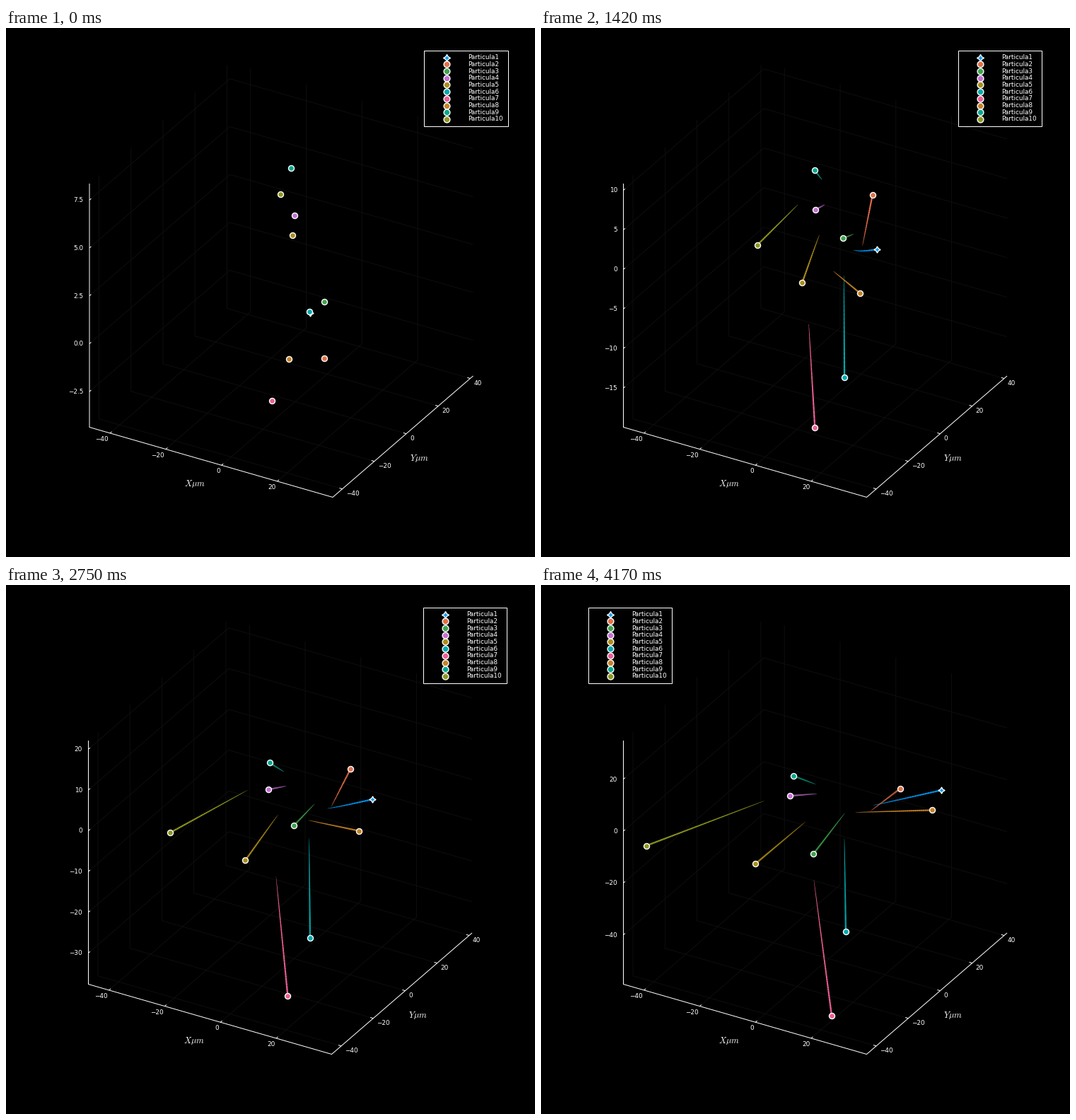
A matplotlib script for the animation above (4210 ms loop, 748 by 748 pixels).

```python
import numpy as np
import matplotlib.pyplot as plt
from matplotlib.animation import FuncAnimation
from matplotlib.collections import LineCollection
from matplotlib.patches import Rectangle

SIZE, FRAMES, LOOP = 748, 101, 4210
PT = 0.72  # points per pixel at 100 dpi
GRID = "#111111"

plt.rcParams["font.family"] = "DejaVu Sans"
plt.rcParams["mathtext.fontset"] = "cm"

# Plot box in pixels: left floor corner and the three edges
LEFT = np.array([118, 564.5])
EX = np.array([344, 99])
EY = np.array([198.5, -171.5])
UP = np.array([0, -344.5])
XLIM, YLIM = (-47.4, 39.9), (-46, 41.8)
TICK = 0.012

# Colour, start and velocity per frame: screen x, depth offset, height
PARTICLES = [
    ("#009AF9", (429.6, -31.4, 0.43), (1.38, -0.31, 0)),
    ("#E36F47", (450.2, -20.7, -1.54), (0.59, 0.79, 0.337)),
    ("#3EA44E", (449.8, -48.6, 0.4), (-0.63, 1.1, 0.077)),
    ("#C371D2", (408, -35, 5.42), (-0.545, -0.06, -0.028)),
    ("#AC8E18", (405, -18.2, 5), (-1, -0.14, -0.267)),
    ("#00AAAE", (429.5, -39, 0.22), (0.03, -0.26, -0.583)),
    ("#ED5E93", (376.5, -28, -4), (0.36, 1.115, -0.444)),
    ("#C68225", (399.6, -32.5, -2), (1.553, -0.69, -0.176)),
    ("#00A98D", (403.3, -32, 8), (-0.447, 0.03, 0.054)),
    ("#8E971E", (388.2, -48, 6.05), (-2.38, 0.2, -0.192)),
]
COLORS, START, SPEED = zip(*PARTICLES)
COUNT = len(COLORS)


def tracks():
    """Straight drift, bent at first where close neighbours push apart in height."""
    start, t = np.array(START), np.arange(FRAMES)
    gap = start[:, None] - start[None]
    near = np.exp(-np.linalg.norm(gap * (1, 1, 15), axis=2) / 7)
    push = 5 * (near * np.sign(gap[..., 2])).sum(axis=1)
    x, depth, z = (start[..., None] + np.array(SPEED)[..., None] * t).swapaxes(0, 1)
    return x, depth, z - push[:, None] * (1 - np.exp(-t / 10))


X, DEPTH, Z = tracks()

fig = plt.figure(figsize=(SIZE / 100, SIZE / 100), dpi=100, facecolor="black")


def layer():
    ax = fig.add_axes([0, 0, 1, 1])
    ax.axis("off")
    ax.set_ylim(SIZE, 0)
    return ax


def shift(ax, dx):
    """Move everything on a layer left by dx pixels."""
    ax.set_xlim(dx, dx + SIZE)


def label(ax, x, y, text, ha="left"):
    return ax.text(x, y, text, color="white", fontsize=8.9 * PT, ha=ha, va="center")


def num(v, digits=0):
    return f"{v:.{digits}f}".replace("-", "\u2212")


def lines(ax, segs, color, width, z):
    lc = LineCollection(segs, colors=color, linewidths=width * PT, zorder=z)
    ax.add_collection(lc, autolim=False)
    return lc


def marker(ax, i, x, y, size):
    shape, extra = ((4, 1, 0), 1.2) if i == 0 else ("o", 0)
    return ax.plot([x], [y], marker=shape, ms=(size + extra) * PT, mew=1.4 * PT,
                   mfc=COLORS[i], mec="white", ls="none", zorder=3.05 + i * 0.1)[0]


def axis_ticks(lim, corner, edge, step=20):
    """Round values inside the limits with their points on the edge."""
    lo, hi = lim
    for v in np.arange(np.ceil(lo / step), np.floor(hi / step) + 1) * step:
        yield v + 0.0, corner + (v - lo) / (hi - lo) * edge


plot, legend = layer(), layer()

# Fixed axes, x and y ticks and grid
grid, edges = [], [(LEFT + UP, LEFT, LEFT + EX, LEFT + EX + EY)]
for v, p in axis_ticks(XLIM, LEFT, EX):
    grid.append((p, p + EY, p + EY + UP))
    edges.append((p, p + TICK * EY))
    label(plot, p[0] - 2, p[1] + 8.5, num(v), "right")
for v, p in axis_ticks(YLIM, LEFT, EY):
    q = p + EX
    grid.append((q, p, p + UP))
    edges.append((q, q - TICK * EX))
    label(plot, q[0] + 5, q[1] + 6.7, num(v))
lines(plot, grid, GRID, 0.8, 1)
lines(plot, edges, "white", 1, 2)
for x, y, s in ((267, 648, r"$X\mu m$"), (584, 612, r"$Y\mu m$")):
    plot.text(x, y, s, color="white", fontsize=12.2 * PT, ha="center", va="baseline")

# Parts that are rebuilt every frame
z_grid = lines(plot, [], GRID, 0.8, 1)
z_marks = lines(plot, [], "white", 1, 2)
z_labels = [label(plot, LEFT[0] - 8.5, 0, "", "right") for _ in range(8)]
trails = [lines(plot, [], c, 1, 3 + i * 0.1) for i, c in enumerate(COLORS)]
dots = [marker(plot, i, 0, 0, 8) for i in range(COUNT)]

legend.add_patch(Rectangle((591.5, 31.5), 118.5, 107, fc="black", ec="white", lw=PT))
for i in range(COUNT):
    y = 41.6 + 9.7 * i
    marker(legend, i, 623, y, 8.8)
    label(legend, 653, y, f"Particula{i + 1}")


def z_ticks(lim):
    """Ticks at the widest step that still gives at least four."""
    for step in (20, 10, 5, 2.5):
        ticks = list(axis_ticks(lim, LEFT, UP, step))
        if len(ticks) >= 4:
            break
    return step, ticks


def update(n):
    past = Z[:, :n + 1]
    lo, hi = past.min(), past.max()
    pad = 0.03 * (hi - lo)
    lo, hi = lo - pad, hi + pad

    step, ticks = z_ticks((lo, hi))
    z_grid.set_segments([(p, p + EY, p + EY + EX) for _, p in ticks])
    z_marks.set_segments([(p, p + TICK * EY) for _, p in ticks])
    for text in z_labels:
        text.set_text("")
    for text, (v, p) in zip(z_labels, ticks):
        text.set_y(p[1] + 0.5)
        text.set_text(num(v, 1 if step == 2.5 else 0))

    # Shorter tick labels move the plot a little to the left
    dx = 1.5 if step > 2.5 else 0
    shift(plot, dx)
    shift(legend, 524.5 if n >= 72 else dx)

    # Trails show the latest 70 % of the path as a needle
    y = LEFT[1] + DEPTH[:, :n + 1] + (past - lo) / (hi - lo) * UP[1]
    age = (np.arange(1, n + 1) / max(n, 1) - 0.3) / 0.7
    seen = age > 0
    for i in range(COUNT):
        pts = np.column_stack([X[i, :n + 1], y[i]])
        trails[i].set_segments(np.stack([pts[:-1], pts[1:]], axis=1)[seen])
        trails[i].set_linewidth(2.4 * PT * np.sqrt(age[seen]))
        dots[i].set_data(pts[-1:, 0], pts[-1:, 1])
    return []


anim = FuncAnimation(fig, update, frames=FRAMES, interval=LOOP / FRAMES,
                     repeat=True, repeat_delay=0, cache_frame_data=False)
plt.show()
```
